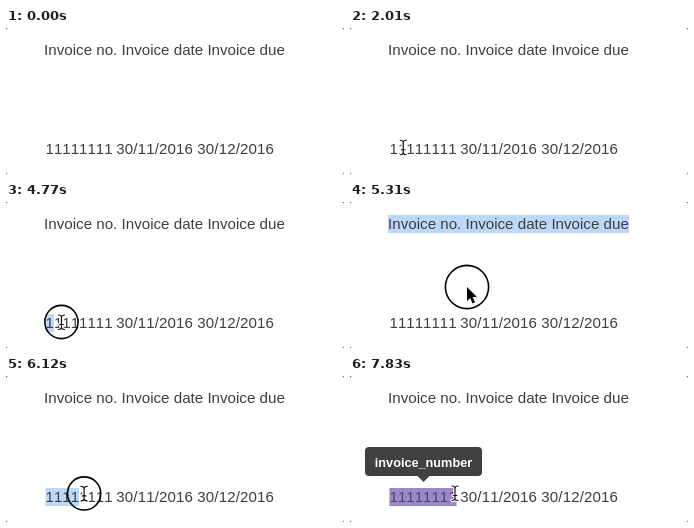
An HTML page that plays this animation: 338x146 px, repeating every 8 s.

```html
<!DOCTYPE html>
<html lang="en">
<head>
<meta charset="utf-8">
<title>Selecting an invoice number</title>
<style>
  html, body { margin: 0; width: 100%; height: 100%; overflow: hidden; background: #fff; }
  svg { display: block; width: 338px; height: 146px; }
  text { font-family: "Liberation Sans", Arial, sans-serif; font-kerning: none; white-space: pre; }
  .page { font-size: 15.15px; fill: #3e3e3e; }
  .num { font-size: 15.05px; }
  .date { letter-spacing: .15px; }
  .tip { font-size: 12.7px; font-weight: bold; fill: #fff; }
</style>
</head>
<body>
<svg viewBox="0 0 338 146">
  <rect width="338" height="146" fill="#5a5a5a"/>
  <rect width="338" height="146" rx="2.5" fill="#fff"/>
  <rect id="mark" height="18" fill="#bdd7f9"/>
  <g class="page">
    <text x="38.1" y="27.2">Invoice no. Invoice date Invoice due</text>
    <g class="num">
      <text x="39.6" y="126.1">11111111</text>
      <text class="date" x="110.3" y="126.1">30/11/2016</text>
      <text class="date" x="191.3" y="126.1">30/12/2016</text>
    </g>
  </g>
  <g id="label">
    <rect x="39.5" y="112" width="67" height="18" fill="#783c96" fill-opacity=".5"/>
    <rect x="15" y="71" width="117" height="29" rx="4" fill="#404040"/>
    <path d="M67 99.5h13l-6.5 6.5z" fill="#404040"/>
    <text class="tip" x="73.5" y="91" text-anchor="middle">invoice_number</text>
  </g>
  <g id="pointer">
    <path id="arrow" d="M0 0V14L3.2 11L5.5 16.4L8 15.3L5.7 10.1H10Z"
      fill="#000" stroke="#fff" stroke-width="1.6" paint-order="stroke" stroke-linejoin="round"/>
    <g id="beam" fill="none" stroke-linecap="round">
      <path id="halo" stroke="#fff" stroke-width="3.6"/>
      <path id="stem" stroke="#111" stroke-width="1.2"/>
    </g>
    <circle id="ring" fill="none" stroke="#000" stroke-width="1.6"/>
  </g>
</svg>
<script>
const LOOP = 8000, STEP = 30;
const LEFT = 39.5, DIGIT = 8.37, TEXT_TOP = 112;

const origin = { x: 135, y: 148 };
const moves = [
  { from: 930, to: 1380, x: 55, y: 119.2 },
  { from: 1980, to: 2100, x: 51, y: 119.5 },
  { from: 2280, to: 2550, x: 68.5, y: 119 },
  { from: 3240, to: 3420, x: 56, y: 120.5 },
  { from: 3630, to: 3810, x: 36.5, y: 121 },
  { from: 3960, to: 4200, x: 41, y: 121 },
  { from: 4710, to: 5310, x: 117, y: 85 },
  { from: 5490, to: 6030, x: 66, y: 117.5 },
  { from: 6030, to: 6560, x: 105, y: 117 }
];
const presses = [[1650, 1740], [2550, 2610], [2820, 2910], [3420, 3480], [4560, 6870]];
const WORD = [2850, 3510], DRAG = 4740;

const el = id => document.getElementById(id);
const set = (id, attrs) => { for (const k in attrs) el(id).setAttribute(k, attrs[k]); };
const show = (id, on) => { el(id).style.display = on ? "" : "none"; };
const within = (t, [a, b]) => t >= a && t < b;
const clamp = (v, lo, hi) => Math.max(lo, Math.min(hi, v));

const beamShape = "M-3 -7Q-.3 -7 0 -5Q.3 -7 3 -7M0 -5V5.5M-3 7.5Q-.3 7.5 0 5.5Q.3 7.5 3 7.5M-1.8 2.5H1.8";
set("halo", { d: beamShape });
set("stem", { d: beamShape });

// The hand sweeps sideways first and up or down a little later
function at(t) {
  let { x, y } = origin;
  for (const m of moves) {
    const u = clamp((t - m.from) / (m.to - m.from), 0, 1);
    x += (m.x - x) * u * (2 - u);
    y += (m.y - y) * u * u * (3 - 2 * u);
  }
  return [x, y];
}

function selection(t) {
  if (within(t, WORD)) return [LEFT, TEXT_TOP, 8 * DIGIT];
  if (t < DRAG) return [0, 0, 0];
  const [x, y] = at(t - STEP);
  if (y < TEXT_TOP) return [38, 13, 241];
  return [LEFT, TEXT_TOP, clamp(Math.round((x - LEFT) / DIGIT), 0, 8) * DIGIT];
}

function draw(t) {
  const [x, y] = at(t);
  const overText = t >= 2010 && x > 39 && y >= TEXT_TOP;
  const [sx, sy, width] = selection(t);
  set("mark", { x: sx, y: sy, width });
  set("pointer", { transform: `translate(${x} ${y})` });
  show("arrow", !overText);
  show("beam", overText);
  show("ring", presses.some(p => within(t, p)));
  set("ring", { r: overText ? 16.6 : 21.6 });
  set("label", { opacity: clamp((t - 7650) / 150, 0, 1) });
}

const start = performance.now();
function tick() {
  const t = (performance.now() - start) % LOOP;
  draw(Math.floor(t / STEP) * STEP);
  requestAnimationFrame(tick);
}
tick();
</script>
</body>
</html>
```
